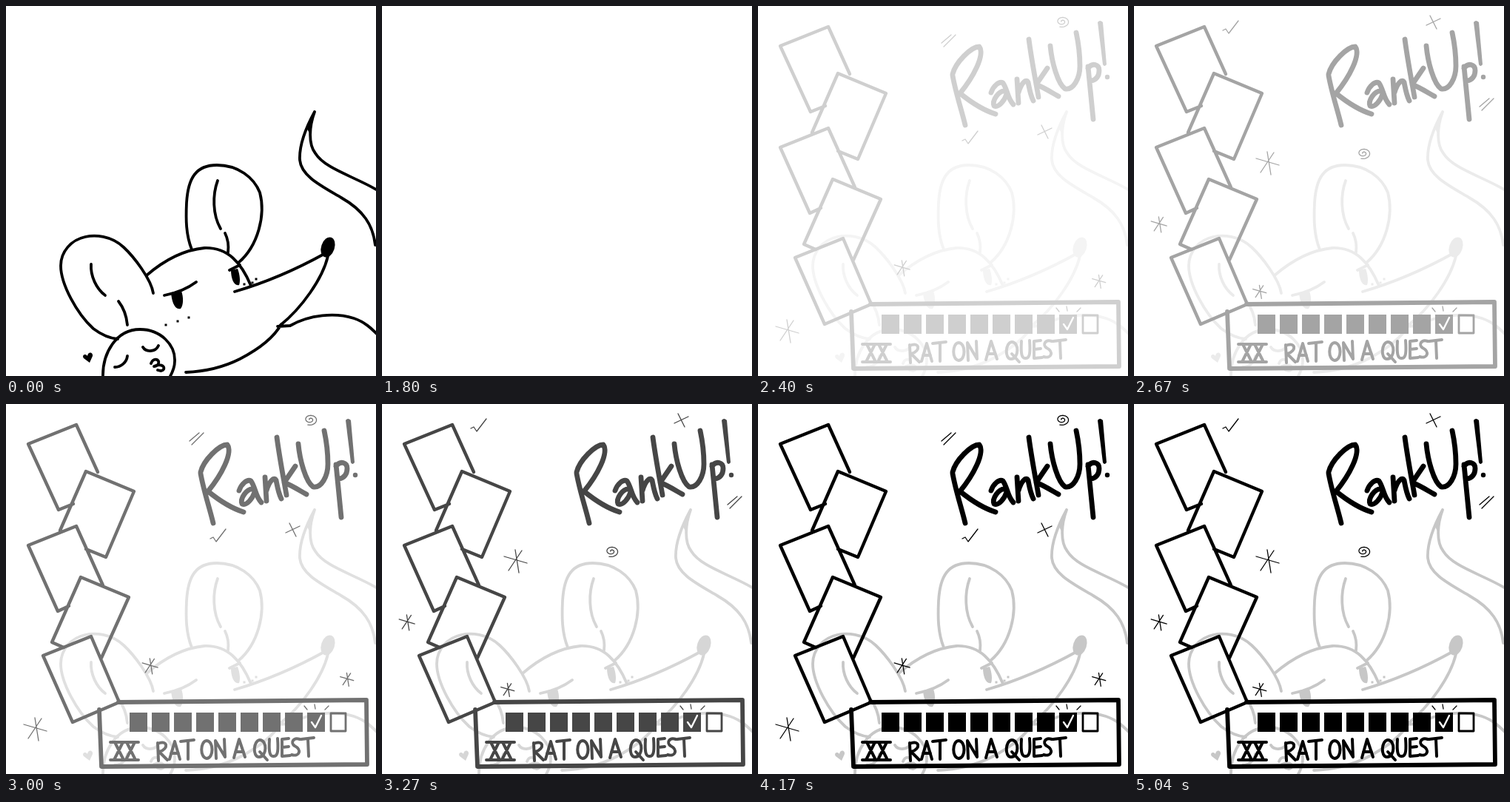
An HTML page with a canvas for the animation above (5310 ms loop, 500 by 500 pixels).

```html
<!DOCTYPE html>
<html lang="en">
<head>
<meta charset="utf-8">
<title>Rank up</title>
<style>
html, body { margin: 0; width: 100%; height: 100%; overflow: hidden; background: #fff; }
canvas { display: block; width: 500px; height: 500px; }
</style>
</head>
<body>
<canvas id="stage" width="500" height="500" role="img" aria-label="Rank Up! XX Rat on a quest"></canvas>
<script>
const ctx = document.getElementById('stage').getContext('2d');
const LOOP = 5310, RAT_END = 1800;
const FADE = [2220, 2310, 2400, 2520, 2610, 2670, 2790, 2910,
  3000, 3120, 3210, 3270, 3390, 3480, 3540, 3660];
const TOGGLES = [2400, 2670, 3000, 3270, 3540, 3870, 4170, 4440, 4770, 5040];

const gray = a => {
  const v = Math.round(255 * (1 - a));
  return `rgb(${v},${v},${v})`;
};
const shape = d => new Path2D(d);

const ears = shape(`M199 388C196 369 173 339 159 326C142 310 120 309 107 312
  C88 316 74 332 74 351C74 376 96 416 118 436C130 445 140 449 151 450
  M115 349C114 365 122 382 134 391M152 399C159 408 163 420 164 431
  M251 329C243 309 243 288 244 266C246 232 257 215 285 215
  C314 215 335 232 343 252C351 282 341 324 314 347
  M286 236C279 255 279 282 290 301M296 307C301 317 301 325 300 333`);
const head = shape(`M190 364C212 345 237 330 268 327C300 326 318 347 331 378
  M309 386C350 374 392 356 430 335M435 338C428 368 400 408 370 432
  M372 430C362 448 341 464 316 477C294 488 270 494 243 495
  M367 433L384 432C410 417 445 414 470 422C485 427 494 436 502 444
  M214 391C230 388 245 382 257 373M302 357L316 350`);
const tail = shape(`M417 143C405 165 396 188 397 208C399 230 426 243 453 259
  C483 276 496 296 499 323M417 143C410 162 408 186 418 199C431 220 470 230 502 249`);
const tip = shape('M417 143L407 166L411 174Z');
const eyes = shape(`M223 387L237 385C240 394 240 404 236 409C228 411 224 400 223 387Z
  M304 357L313 355C316 363 317 372 315 377C308 379 304 368 304 357Z`);
const friend = shape(`M131 502C130 469 149 437 181 437C209 437 229 458 228 480
  C228 489 225 495 221 502M185 461C189 468 202 468 206 459
  M147 488C155 488 163 482 164 473
  M196 483C199 475 208 477 206 483C205 486 202 487 200 487C208 483 215 486 213 491C211 494 208 493 205 492`);
const heart = shape('M113 482L105 476C102 472 107 469 110 473C111 466 118 468 117 473Z');
const freckles = [[216, 431], [232, 426], [247, 421], [322, 376], [333, 374], [338, 369]];

const title = shape(`M263 94C267 117 275 140 280 161M263 92C267 76 288 55 299 55
  C307 66 291 96 273 118C289 131 305 141 321 146
  M315 117C318 108 326 101 331 104C337 112 337 125 345 133
  M334 115C325 114 316 128 319 135C325 138 333 128 336 119
  M350 99L352 131M352 117C356 104 362 98 365 103C367 113 368 120 372 128
  M366 45C370 75 375 100 379 123M391 84L376 106C386 110 397 117 406 122
  M395 54C397 76 405 105 415 112C426 114 435 98 435 81C435 65 433 50 430 36
  M446 82L453 153M446 84C452 76 461 79 461 87C461 95 457 100 450 101`);
const bang = shape('M459 22Q462 18 466 22L471 79Q468 83 466 79Z');

const cards = shape(`M91 135L71 143L30 54L95 28L124 92
  M73 171L108 91L173 118L135 207L108 196
  M85 273L70 280L30 191L95 165L131 245
  M78 329L62 322L101 234L166 261L129 343
  M50 340L115 314L153 403L90 430Z`);
const panel = shape('M126 413L129 490L488 487L487 400L152 403');
const numeral = shape(`M141 457H179M141 481H179
  M147 457L159 481M158 457L146 481M163 457L175 481M174 457L162 481`);
const caption = shape(`M205 458L206 482M205 459C218 453 221 466 207 470L218 481
  M221 480L228 456L235 480M223 472H233M236 456L254 454M246 456V480
  M271 455C262 456 262 478 271 479C281 479 281 455 271 455Z
  M284 479L283 455L296 477L295 453M308 478L315 453L323 477M310 470H321
  M343 454C334 455 333 477 342 477C353 477 353 454 343 454ZM343 470L353 481
  M356 453C355 469 356 477 362 476C368 476 368 466 367 452
  M382 452L373 453L373 476L384 475M373 464L382 463
  M397 453C388 450 384 458 390 462C400 467 397 477 386 474
  M399 453L416 451M408 453L409 476`);
const rays = shape('M403 408L407 413M417 406L418 412M436 408L431 413');
const tick = shape('M413 430L418 437L426 421');

// Small doodles, each around its own centre
const star = shape('M-16 -6L15 3M-1 -15L4 16M8 -14L-10 13');
const doodles = {
  slashes: shape('M-10 4L3 -7M-7 9L9 -7'),
  check: shape('M-11 5L-7 3L-3 9L10 -8'),
  cross: shape('M-10 4L9 -5M-5 -9L4 9'),
  spiral: spiral()
};

function spiral() {
  const p = new Path2D();
  for (let i = 0; i <= 60; i++) {
    const a = i / 60 * Math.PI * 3.6, r = 1 + i / 60 * 9;
    p.lineTo(-Math.cos(a) * r, -Math.sin(a) * r * 0.76);
  }
  return p;
}

const POSES = [
  { slashes: [258, 46], check: [287, 177], cross: [388, 170], spiral: [411, 21],
    stars: [[40, 439, 1], [195, 354, 0.68], [461, 372, 0.58]] },
  { slashes: [477, 132], check: [131, 28], cross: [405, 22], spiral: [310, 199],
    stars: [[181, 212, 1], [34, 295, 0.68], [170, 386, 0.58]] }
];

function ink(color) {
  ctx.strokeStyle = ctx.fillStyle = color;
  ctx.lineCap = ctx.lineJoin = 'round';
}

function line(path, width) {
  ctx.lineWidth = width;
  ctx.stroke(path);
}

function drawRat(color) {
  ink(color);
  for (const p of [ears, head, tail, friend]) line(p, 3.8);
  for (const p of [tip, eyes, heart]) ctx.fill(p);
  ctx.beginPath();
  ctx.ellipse(435, 326, 9, 14, 0.32, 0, 7);
  ctx.fill();
  for (const [x, y] of freckles) ctx.fillRect(x - 1.5, y - 1.5, 3, 3);
}

function drawBoard(color) {
  ink(color);
  line(title, 6.8);
  ctx.fill(bang);
  ctx.beginPath();
  ctx.arc(472, 96, 3.2, 0, 7);
  ctx.fill();
  line(cards, 4.4);
  line(panel, 5.8);
  line(numeral, 4);
  line(caption, 4);
  line(rays, 1.3);
  for (let i = 0; i < 9; i++) ctx.fillRect(167 + i * 30, 417, 24, 26);
  ctx.lineWidth = 2.8;
  ctx.strokeRect(439, 418, 20, 24);
  ctx.strokeStyle = '#fff';
  line(tick, 2.4);
}

function doodle(path, x, y, scale = 1) {
  ctx.save();
  ctx.translate(x, y);
  ctx.scale(scale, scale);
  line(path, 1.3 / scale);
  ctx.restore();
}

function drawDoodles(pose, color) {
  ink(color);
  for (const name in doodles) doodle(doodles[name], ...pose[name]);
  for (const s of pose.stars) doodle(star, ...s);
}

function render(t) {
  ctx.fillStyle = '#fff';
  ctx.fillRect(0, 0, 500, 500);
  if (t < RAT_END) return drawRat('#000');
  const step = FADE.filter(s => s <= t).pop();
  if (!step) return;
  const a = step === FADE[FADE.length - 1] ? 1 : (step - 2090) / 1630;
  const flips = TOGGLES.filter(s => s <= t).length;
  drawRat(gray(a * 0.22));
  drawBoard(gray(a));
  drawDoodles(POSES[(flips + 1) % 2], gray(a));
}

const start = performance.now();
function loop() {
  render((performance.now() - start) % LOOP);
  requestAnimationFrame(loop);
}
loop();
</script>
</body>
</html>
```
